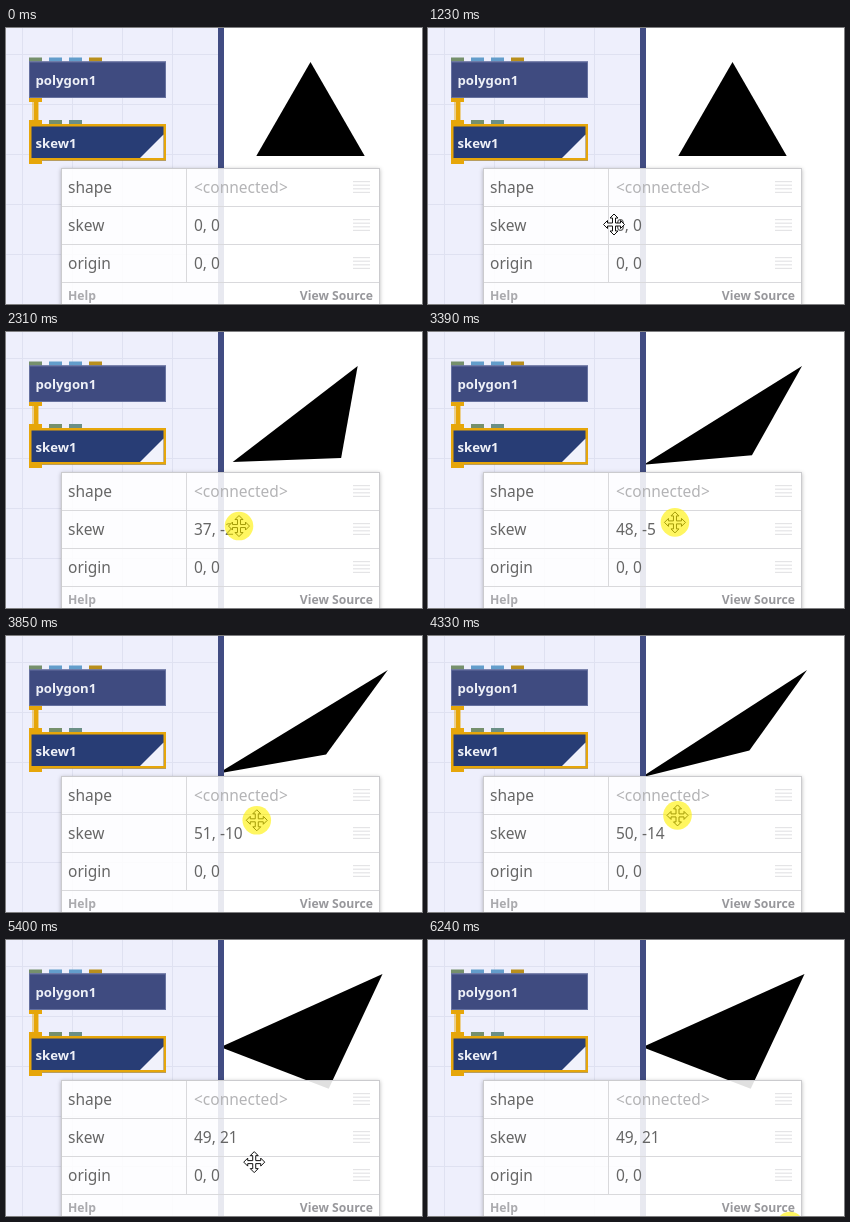
Animation of 416x276 px, one loop 6320 ms. Source, as an HTML page with a canvas:

```html
<!DOCTYPE html>
<html lang="en">
<head>
<meta charset="utf-8">
<title>Skew node</title>
<style>
html, body { margin: 0; width: 100%; height: 100%; overflow: hidden; background: #fff; }
canvas { display: block; width: 416px; height: 276px; }
</style>
</head>
<body>
<canvas id="stage"></canvas>
<script>
const W = 416, H = 276, LOOP = 6320, TICKS = 82;
const canvas = document.getElementById('stage');
const ctx = canvas.getContext('2d');
const dpr = window.devicePixelRatio || 1;
canvas.width = W * dpr;
canvas.height = H * dpr;

const FONT = '"Noto Sans", "Open Sans", sans-serif';
const ORANGE = '#e6a60a', GREEN = '#76906c', BLUE = '#639dcb';

// Drag strokes: first tick, last tick, skew reached in degrees
const STROKES = [
  [20, 30, 37, -2], [39, 44, 48, -5], [46, 52, 53, -12],
  [54, 56, 50, -14], [56, 63, 48, 15], [63, 67, 49, 21]
];

const within = (n, a, b) => n >= a && n < b;
const progress = (n, a, b) => Math.min(1, Math.max(0, (n - a) / (b - a)));
const mix = (p, q, k) => p.map((v, i) => v + (q[i] - v) * k);

const skewAt = n => STROKES.reduce(
  (skew, [a, b, ...goal]) => mix(skew, goal, progress(n, a, b)), [0, 0]);

// While dragging, the pointer position follows from the skew
function pointerAt(n, skew) {
  const dragged = [186 + skew[0] * 1.27, 196.5 + skew[1] * 1.22];
  if (n < 15) return mix([326, 268], [178, 198], 1 - (1 - progress(n, 4, 12)) ** 1.5);
  return mix(dragged, [362, 286], progress(n, 72, 76));
}

function rect(color, x, y, w, h) {
  ctx.fillStyle = color;
  ctx.fillRect(x, y, w, h);
}

function frame(color, x, y, w, h, line) {
  ctx.strokeStyle = color;
  ctx.lineWidth = line;
  ctx.strokeRect(x + line / 2, y + line / 2, w - line, h - line);
}

function poly(color, points) {
  ctx.fillStyle = color;
  ctx.beginPath();
  for (const [x, y] of points) ctx.lineTo(x, y);
  ctx.closePath();
  ctx.fill();
}

function text(str, x, y, size, color, weight = 400, align = 'left') {
  ctx.font = `${weight} ${size}px ${FONT}`;
  ctx.textAlign = align;
  ctx.fillStyle = color;
  ctx.fillText(str, x, y);
}

function drawNode(name, y, fill, edge, line, ports) {
  ports.forEach((c, i) => rect(c, 23 + i * 20, y - 4, 13, 4));
  rect(fill, 23, y, 137, 36.5);
  frame(edge, 23, y, 137, 36.5, line);
  text(name, 29.5, y + 23.5, 13.2, '#eef0f7', 600);
}

function drawNetwork() {
  rect('#eeeffc', 0, 0, 212, H);
  for (let x = 16; x < 212; x += 50) rect('#dfe1f1', x, 0, 1, H);
  for (let y = 26; y < H; y += 50) rect('#dfe1f1', 0, y, 212, 1);
  rect('#414c82', 212, 0, 6, H);

  drawNode('polygon1', 33.5, '#3f4b80', '#66719f', 1, [GREEN, BLUE, BLUE, '#b98f1c']);
  rect('rgba(230,166,10,.45)', 26, 70, 7, 26);
  rect(ORANGE, 28, 70, 4, 26);
  rect(ORANGE, 23, 70, 13, 4);
  drawNode('skew1', 96, '#283d75', ORANGE, 2.5, [ORANGE, GREEN, '#6b8f86']);
  poly('#f1f2fb', [[134, 130], [157.5, 106.5], [157.5, 130]]);
  rect(ORANGE, 23, 132, 13, 4);
}

function drawShape(skew) {
  const [tx, ty] = skew.map(v => Math.tan(v * Math.PI / 180));
  const points = [0, 1, 2].map(i => {
    const a = i * Math.PI * 2 / 3 - Math.PI / 2;
    const x = 62.6 * Math.cos(a), y = 62.6 * Math.sin(a);
    return [304.5 + x - y * tx, 96.7 + y + x * ty];
  });
  ctx.save();
  ctx.beginPath();
  ctx.rect(218, 0, W - 218, H);
  ctx.clip();
  poly('#000', points);
  ctx.restore();
}

function drawPanel(skew) {
  // Shadow only outside the translucent sheet
  ctx.save();
  ctx.beginPath();
  ctx.rect(0, 0, W, H);
  ctx.rect(55, 140, 319, 160);
  ctx.clip('evenodd');
  ctx.shadowColor = 'rgba(0,0,0,.28)';
  ctx.shadowBlur = 4 * dpr;
  ctx.shadowOffsetY = dpr;
  rect('#fff', 55, 140, 319, 160);
  ctx.restore();

  rect('rgba(255,255,255,.88)', 55, 140, 319, 136);
  frame('#cbcbce', 55, 140, 319, 160, 1);
  rect('#d9d9dc', 180, 141, 1, 113);

  const rows = [['shape', '<connected>'], ['skew', skew.join(', ')], ['origin', '0, 0']];
  rows.forEach(([label, value], i) => {
    const y = 140 + i * 38;
    rect('#d9d9dc', 56, y + 38, 317, 1);
    text(label, 62, y + 25, 15.5, '#666');
    text(value, 188, y + 25, 15.5, i ? '#666' : '#b4b4b6');
    for (let k = 0; k < 4; k++) rect('#e4e4e6', 347, y + 13 + k * 3.6, 17, 1.2);
  });
  text('Help', 62, 272, 12.2, '#aaaaae', 600);
  text('View Source', 367, 272, 12.2, '#98989c', 600, 'right');
}

function outline(points) {
  poly('#fff', points);
  ctx.strokeStyle = '#111';
  ctx.lineWidth = 1;
  ctx.stroke();
}

function drawMoveGlyph() {
  const arm = [[-1.5, -1.5], [-1.5, -6.5], [-4, -6.5], [0, -10.5], [4, -6.5], [1.5, -6.5]];
  const turn = ([x, y]) => [-y, x];
  const points = [];
  for (let i = 0, side = arm; i < 4; i++, side = side.map(turn)) points.push(...side);
  outline(points);
}

function drawPointer(n, skew) {
  ctx.save();
  ctx.translate(...pointerAt(n, skew));
  if (within(n, 15, 73)) {
    drawMoveGlyph();
  } else if (within(n, 4, 76)) {
    outline([[0.5, 0.5], [0.5, 16.5], [4.2, 13], [6.6, 18.5], [9, 17.5], [6.6, 12], [11.6, 12]]);
  }
  const pressed = within(n, 20, 32) || within(n, 38, 70) || n >= 81;
  if (pressed) {
    ctx.fillStyle = 'rgba(255,240,0,.62)';
    ctx.beginPath();
    ctx.arc(0, 0, 14.3, 0, Math.PI * 2);
    ctx.fill();
  }
  ctx.restore();
}

function draw() {
  const t = performance.now() % LOOP;
  const n = Math.min(TICKS - 1, Math.floor((t + 18) * TICKS / LOOP));
  const skew = skewAt(n).map(v => Math.round(v) || 0);
  ctx.setTransform(dpr, 0, 0, dpr, 0, 0);
  rect('#fff', 0, 0, W, H);
  drawNetwork();
  drawShape(skew);
  drawPanel(skew);
  drawPointer(n, skew);
  requestAnimationFrame(draw);
}

draw();
</script>
</body>
</html>
```
